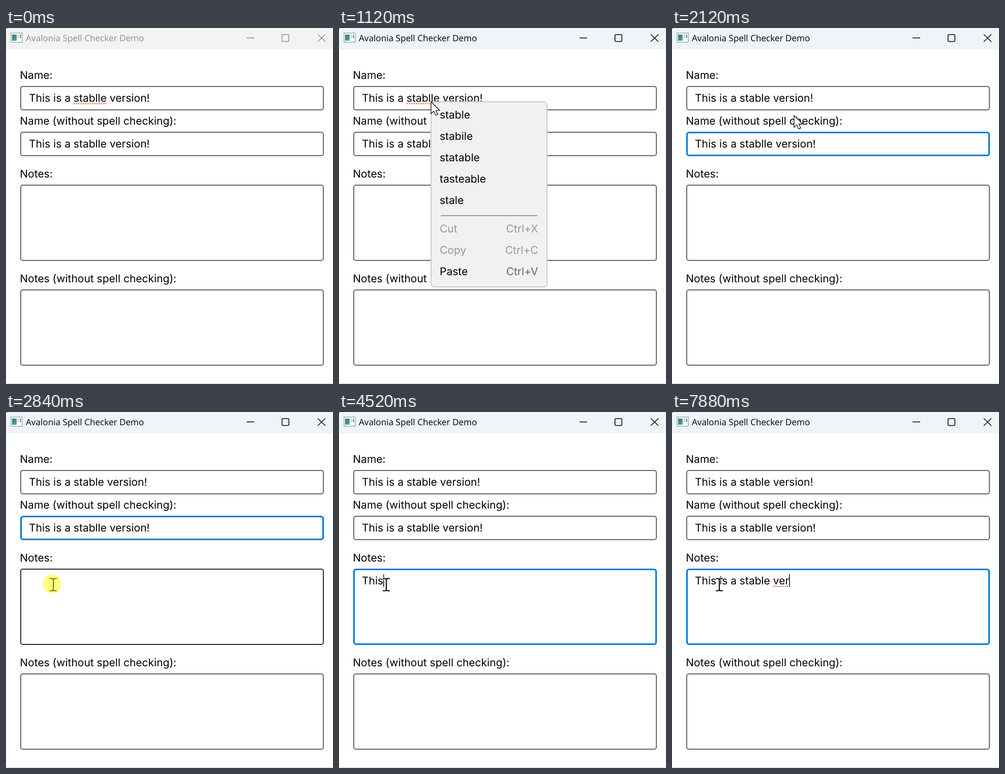
These frames come from a looping animation (643x700 px, 8 s). An HTML page:

```html
<!DOCTYPE html>
<html lang="en">
<head>
<meta charset="utf-8">
<title>Spell checker demo</title>
<style>
  html, body { margin: 0; height: 100%; overflow: hidden; background: #fff; }
  svg { display: block; }
  text { font: 400 21px Inter, sans-serif; font-optical-sizing: none; white-space: pre; text-rendering: geometricPrecision; }
  #title { font: 17.15px "Open Sans", sans-serif; fill: currentColor; }
  .field { fill: #fff; }
  .typo { stroke: #f0501e; stroke-width: 1.5; stroke-dasharray: 3 1.5; }
  .off { fill: #999; }
  .end { text-anchor: end; }
</style>
</head>
<body>
<svg id="stage" width="643" height="700" viewBox="0 0 643 700" fill="none">
  <defs>
    <linearGradient id="pane" x2="1" y2="1">
      <stop stop-color="#356f9c"/><stop offset="1" stop-color="#4fae88"/>
    </linearGradient>
  </defs>
  <g id="bar">
    <rect id="barFill" width="643" height="42"/>
    <path d="M0 .5H2" stroke="#444"/>
    <g id="icon">
      <rect x="10" y="10" width="22" height="18" fill="#fff" stroke="#a3adb3" stroke-width="1.5"/>
      <rect x="12" y="13" width="9" height="12" fill="url(#pane)"/>
      <path d="M24 13V20" stroke="#b9c6cd" stroke-width="2"/>
      <path d="M28.5 13V20" stroke="#3f8f83" stroke-width="2"/>
    </g>
    <text id="title" x="39" y="26">Avalonia Spell Checker Demo</text>
    <path d="M473 19.5H488M613 12.5L628 27M628 12.5L613 27" stroke="currentColor" stroke-width="1.4"/>
    <rect x="542.7" y="13" width="13.6" height="13.4" rx="2" stroke="currentColor" stroke-width="1.5"/>
  </g>
  <path d="M0 699H643" stroke="#dfe1e2" stroke-width="1.5"/>
  <g id="form"></g>
  <g id="menu"></g>
  <g id="ibeam">
    <path id="beam" d="M-7 -12H-3Q0 -12 0 -9.500Q0 -12 3 -12H7M0 -10V10M-7 12H-3Q0 12 0 9.500Q0 12 3 12H7" stroke="#fff" stroke-width="4"/>
    <use href="#beam" style="stroke:#000"/>
    <path d="M-7 -12H-3Q0 -12 0 -9.500Q0 -12 3 -12H7M0 -10V10M-7 12H-3Q0 12 0 9.500Q0 12 3 12H7" stroke="#000" stroke-width="2"/>
  </g>
  <path id="arrow" d="M0 0V23.500L5.500 18.500L9 26.500L13 24.700L9.600 17H17Z" fill="#fff" stroke="#000" stroke-width="1.2"/>
  <circle id="click" r="18" fill="#ff0" fill-opacity=".5"/>
</svg>
<script>
const $ = id => document.getElementById(id);
const LOOP = 8000, TICK = 40;

function add(parent, tag, attrs, content = "") {
  const node = document.createElementNS("http://www.w3.org/2000/svg", tag);
  for (const key in attrs) node.setAttribute(key, attrs[key]);
  node.textContent = content;
  return parent.appendChild(node);
}
const label = (parent, x, y, content, cls = "", fill = "#000") =>
  add(parent, "text", cls === "off" || cls === "off end" ? { x, y, class: cls } : { x, y, class: cls, fill }, content);
const show = (node, on) => node.setAttribute("visibility", on ? "visible" : "hidden");

// Form: each field has its top, height and caption
const fields = [
  [114, 48, "Name:"],
  [204, 48, "Name (without spell checking):"],
  [308, 150, "Notes:"],
  [514, 150, "Notes (without spell checking):"],
].map(([top, height, caption]) => {
  label($("form"), 27.3, top - 14, caption);
  const box = add($("form"), "rect", { class: "field", rx: 4 });
  return {
    top, height, box,
    text: label($("form"), 45, top + 31, ""),
    typo: add($("form"), "path", { class: "typo" }),
  };
});
const [nameField, plainName, notes] = fields;
const caret = add($("form"), "path", { stroke: "#000", "stroke-width": 1.5 });

// Context menu
const menu = $("menu");
add(menu, "rect", { x: 181, y: 145, width: 228, height: 364, rx: 6, fill: "#f1f1f1", stroke: "#ccc", "stroke-width": 2 });
const menuHover = add(menu, "rect", { x: 182, y: 152, width: 226, height: 42, fill: "#d9d9d9" });
["stable", "stabile", "statable", "tasteable", "stale"].forEach((word, i) => label(menu, 198, 178 + 42 * i, word));
add(menu, "path", { d: "M200 369H390", stroke: "#999", "stroke-width": 1.8 });
[["Cut", "Ctrl+X", "off"], ["Copy", "Ctrl+C", "off"], ["Paste", "Ctrl+V", ""]].forEach(([name, keys, cls], i) => {
  label(menu, 198, 402 + 42 * i, name, cls);
  label(menu, 391.5, 402 + 42 * i, keys, cls + " end", "#666");
});

// Pointer stops: time, x, y
const stops = [
  [160, 350, 600], [640, 222, 131], [720, 222, 131], [920, 181, 145],
  [1360, 181, 145], [1640, 240, 166], [2120, 240, 172],
  [2360, 240, 172], [2760, 93, 339.5], [LOOP, 93, 339.5],
];
const clicks = [[1000, 1120], [1760, 1920], [2800, 2960]];

// Typing: time, text so far, start of the misspelt word if any
const typing = [
  [0, ""], [3960, "T"], [4240, "Th", 0], [4320, "Thi"], [4440, "This"],
  [4720, "This "], [4840, "This i"], [4920, "This is"], [5040, "This is "], [5160, "This is a "],
  [5640, "This is a s"], [5840, "This is a st", 10], [5880, "This is a sta", 10],
  [6120, "This is a stab"], [6280, "This is a stabl", 10], [6840, "This is a stable"],
  [7040, "This is a stable "], [7280, "This is a stable v"],
  [7560, "This is a stable ve", 17], [7880, "This is a stable ver", 17],
];

function pointerAt(t) {
  const i = Math.max(1, stops.findIndex(stop => stop[0] > t));
  const [t0, x0, y0] = stops[i - 1], [t1, x1, y1] = stops[i];
  const k = Math.min(1, Math.max(0, (t - t0) / (t1 - t0)));
  const e = k * k * (3 - 2 * k);
  return [x0 + (x1 - x0) * e, y0 + (y1 - y0) * e];
}

const widthOf = (text, count) => count ? text.getSubStringLength(0, count) : 0;

function setText(field, value, from, to) {
  if (field.text.textContent !== value) field.text.textContent = value;
  show(field.typo, from !== undefined);
  if (from === undefined) return;
  const y = field.top + 34.7;
  field.typo.setAttribute("d", `M${45 + widthOf(field.text, from)} ${y}H${45 + widthOf(field.text, to)}`);
}

function setBorder(field, focused, hovered) {
  const line = focused ? 3 : 2;
  const attrs = {
    x: 28 + line / 2, y: field.top + line / 2, width: 597 - line, height: field.height - line,
    stroke: focused ? "#0078d7" : hovered ? "#2d2d2d" : "#666", "stroke-width": line,
  };
  for (const key in attrs) field.box.setAttribute(key, attrs[key]);
}

function render(time) {
  const t = Math.floor(time / TICK) * TICK;
  const active = t >= 1000, menuOpen = t >= 1120 && t < 1880, replaced = t >= 1880;

  $("bar").style.color = active ? "#000" : "#8f8f8f";
  $("barFill").setAttribute("fill", active ? "#eff4f7" : "#f3f3f3");

  const [x, y] = pointerAt(Math.floor(t / 80) * 80);
  const focused = t >= 2880 ? notes : replaced ? plainName : null;
  const inside = field => x > 28 && x < 625 && y > field.top && y < field.top + field.height;
  const hovered = t >= 160 && !menuOpen && fields.find(inside);
  fields.forEach(field => setBorder(field, field === focused, field === hovered));

  if (replaced) setText(nameField, "This is a stable version!");
  else setText(nameField, "This is a stablle version!", 10, 17);
  setText(plainName, "This is a stablle version!");

  const [typedAt, typed, typoStart] = typing.filter(step => step[0] <= t).pop();
  setText(notes, typed, typoStart, typed.length);
  const caretX = 45.7 + widthOf(notes.text, typed.length);
  caret.setAttribute("d", `M${caretX} 319.500V344`);
  show(caret, t >= 2880 && (typedAt > 0 || t < 3360 || t >= 3840));

  show(menu, menuOpen);
  menuHover.setAttribute("fill-opacity", y > 152 ? 1 : 0);

  for (const id of ["ibeam", "arrow", "click"]) $(id).setAttribute("transform", `translate(${x} ${y})`);
  show($("ibeam"), hovered);
  show($("arrow"), t >= 160 && !hovered);
  show($("click"), clicks.some(([from, to]) => t >= from && t < to));
  if (t >= 2800) $("click").setAttribute("transform", "translate(90 338)");
}

function loop() {
  render(performance.now() % LOOP);
  requestAnimationFrame(loop);
}
loop();
</script>
</body>
</html>
```
